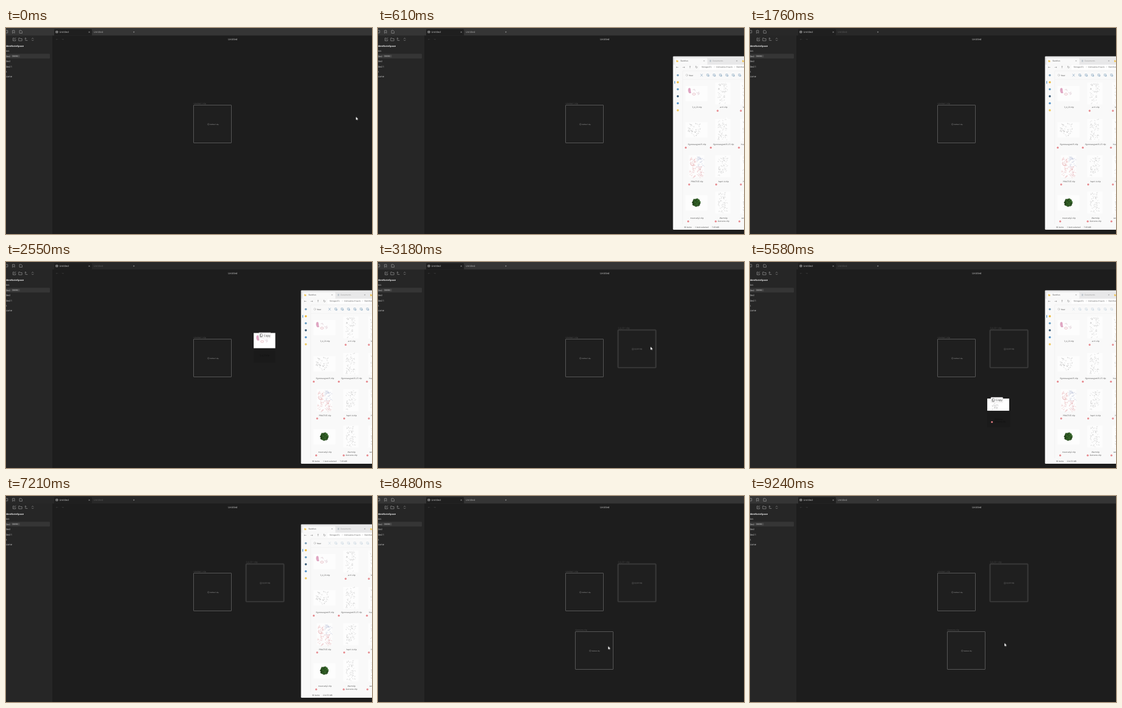
Recreate the animation shown at these times as an HTML page. Size 600 by 338 pixels, loop 9.42 s.

```html
<!DOCTYPE html>
<html lang="en">
<head>
<meta charset="utf-8">
<title>Dragging files onto a canvas</title>
<style>
  html, body { margin: 0; width: 100%; height: 100%; overflow: hidden; background: #1d1d1d; }
  svg { display: block; width: 100vw; height: 100vh; }
  text { font-family: "Open Sans", "Noto Sans", sans-serif; text-rendering: geometricPrecision; }
  .glyph { font-family: "DejaVu Sans", sans-serif; text-anchor: middle; }
  .line { fill: none; stroke: #b0b0b0; stroke-width: .55; stroke-linecap: round; stroke-linejoin: round; }
  .app text { font-size: 4.1px; fill: #cfcfcf; }
  .app .head { font-weight: 700; fill: #e6e6e6; font-size: 3.95px; }
  .app .badge { font-size: 2.4px; font-weight: 600; fill: #d0d0d0; }
  .app .faint { fill: #505050; }
  .card rect { fill: #1f1f1f; stroke: #565656; }
  .card .name { font-size: 3.2px; fill: #5c5c5c; }
  .card .file { font-size: 2.15px; font-weight: 600; fill: #a8a8a8; }
  .card circle { fill: none; stroke: #8c8c8c; stroke-width: .4; }
  .files text { font-size: 3.15px; fill: #444; }
  .files .mid { text-anchor: middle; }
  .files .soft { fill: #909090; }
  .files .glyph { font-size: 5px; fill: #707070; }
  .files .small { font-size: 3.6px; }
  .drag text { font-size: 3.15px; fill: #101010; text-anchor: middle; }
  .drag .shade { fill: #1a1a1a; }
  #tip text { font-size: 4.6px; fill: #333; text-anchor: start; }
</style>
</head>
<body>
<svg viewBox="0 0 600 338" xmlns="http://www.w3.org/2000/svg">
  <defs>
    <g id="tip">
      <rect width="19.5" height="8.6" rx=".6" fill="#fbfbfb" stroke="#ddd6d9" stroke-width=".4"/>
      <path class="line" style="stroke:#555" d="M3 2H5L6 3V6H3ZM3 3H2V7H5V6"/>
      <text x="8" y="6">Copy</text>
    </g>
    <g id="dot">
      <circle r="1.5" fill="#e0696f"/>
      <path d="M-.6 -.6L.6 .6M.6 -.6L-.6 .6" stroke="#fff" stroke-width=".4"/>
    </g>
    <g id="doodle" fill="none" stroke="#dba0ac" stroke-width=".45">
      <path d="M5 5q3-2 3 1q0 3 1 6h-3q-2-3-1-7" stroke="#c8749c" fill="#e3a9c6"/>
      <ellipse cx="14" cy="14" rx="2.6" ry="1.6" stroke="#d07c88"/>
      <path d="M12 7l3-1 1 3M18 11l3 2 1-3M20 15q3 0 3-3" stroke="#c4a4b4"/>
    </g>
    <path id="folder" d="M0 0H1.3L1.8 .6H3.2V3H0Z" fill="#efc65c"/>
  </defs>

  <g class="app">
    <rect width="600" height="338" fill="#1d1d1d"/>
    <rect width="76" height="338" fill="#262626"/>
    <rect id="bar" width="600" height="12.3"/>
    <path d="M79 12.3V3q0-1.2 1.2-1.2H139.600q1.200 0 1.200 1.200V12.300Z" fill="#1f1f1f"/>
    <rect x="-2" y="42.300" width="74" height="7.600" rx="1" fill="#353535"/>
    <rect x="9" y="44" width="13.600" height="4.300" rx=".8" fill="#484848"/>
    <text class="badge" x="10.300" y="47">CANVAS</text>

    <path class="line" d="M-1 4H2.800V8H-1M11 4H14V8.500L12.500 7L11 8.500ZM22.500 4H25L26.500 5.500V8.500H22.500Z"/>
    <path class="line" d="M13.500 16.600H11.400V21H15.800V19M13 19.400L16 16M21.200 16.600H23L23.700 17.500H26.200V21H21.200ZM32 20.500V16.300M31 17.300L32 16.300L33 17.300M33 20.500H35M42.500 17.600L43.700 16.400L44.900 17.600M42.500 19.800L43.700 21L44.900 19.800"/>
    <path class="line" d="M82 5H85V8H82ZM82 6.500H85M83.500 5V8"/>

    <text class="head" x="-.5" y="31">ldenNoteSpace</text>
    <g id="notes"></g>
    <text x="87.500" y="8.200">Untitled</text>
    <text id="tab" x="143.700" y="8.200">Untitled</text>
    <text x="364" y="19.700">Untitled</text>
    <text class="glyph" x="136.500" y="8.200">×</text>
    <text class="glyph" x="209.700" y="8">+</text>
    <text class="glyph faint" x="83.600" y="19.500">←</text>
    <text class="glyph faint" x="93" y="19.500">→</text>
  </g>

  <g id="cards"></g>

  <g id="files" class="files">
    <rect x="483.600" y="46.600" width="120" height="284.400" rx="1" fill="#f9f9f9"/>
    <path d="M484 60.200V47H600V60.200Z" fill="#e8e8e9"/>
    <rect x="486.500" y="49.500" width="53.500" height="11" rx="1.500" fill="#f9f9f9"/>
    <use href="#folder" x="489" y="52.800"/>
    <use href="#folder" x="597" y="52.800"/>
    <rect x="543.700" y="52.500" width="2.500" height="3" fill="#bcc5cc"/>
    <text x="495.700" y="55.200">Sketches</text>
    <text class="soft" x="548.600" y="55.200">Documents</text>
    <rect x="527" y="60.800" width="80" height="7.400" rx="1" fill="#fff"/>
    <text x="530.500" y="65.400">Storage (E:)</text>
    <text x="554.300" y="65.400" style="font-size:2.900px">Inkmeadow Projects</text>
    <text x="587.500" y="65.400">Sketches</text>
    <path d="M500 70.200H600M500 84.300H600M499.500 70V322" stroke="#ebebeb" stroke-width=".5"/>
    <g id="marks"></g>
    <circle class="line" cx="506.300" cy="77.400" r="1.600"/>
    <text x="510" y="78.600">New</text>
    <g id="tools" class="line" style="stroke:#6d93b3"></g>
    <rect x="486" y="86.800" width=".9" height="4.600" rx=".4" fill="#2878bd"/>
    <g id="grid"></g>
    <text x="501.700" y="328">96 items</text>
    <g id="picked">
      <text x="519.600" y="328">1 item selected</text>
      <text x="547.300" y="328">7.83 MB</text>
    </g>
    <text id="total" x="519.600" y="328">224.53 MB</text>
  </g>

  <g id="dragA" class="drag">
    <rect class="shade" y="25" width="35.500" height="23.500"/>
    <rect width="35.500" height="25" fill="#fff"/>
    <use href="#doodle"/>
    <text x="17.700" y="38">3_4_23.clip</text>
    <use href="#tip" x="8.500" y="-.5"/>
  </g>
  <g id="dragB" class="drag">
    <rect class="shade" y="20" width="37.500" height="26.500"/>
    <rect width="36" height="20" fill="#fff"/>
    <g id="dragLines"></g>
    <text x="18.700" y="34.500">WarmUp</text>
    <text x="20.700" y="39">Gestures.clip</text>
    <use href="#dot" x="7.700" y="38.500"/>
    <use href="#tip" x="6" y="-2"/>
  </g>
  <path id="cursor" d="M0 0V5L1.200 4L2 5.600L2.800 5.200L2 3.700H3.600Z" fill="#fff"/>
</svg>

<script>
const LOOP = 9420;
const OPEN = 610, GRAB_A = 2190, DROP_A = 2720, REOPEN = 4360, GRAB_B = 5340, DROP_B = 7190, CLOSE = 8150;
const $ = id => document.getElementById(id);
const fill = (id, items, draw) => { $(id).innerHTML = items.map(draw).join(''); };

function random(seed) {
  seed *= 7919;
  return () => (seed = (seed * 16807) % 2147483647) / 2147483647;
}

// Small curved pencil strokes scattered over a box.
function scribble(x, y, w, h, count, size, seed, color = '#b4b4b4') {
  const next = random(seed);
  const swing = () => ((next() - .5) * size * 2).toFixed(1);
  let d = '';
  for (let i = 0; i < count; i++) {
    d += `M${(x + next() * w).toFixed(1)} ${(y + next() * h).toFixed(1)}` +
         `q${swing()} ${swing()} ${swing()} ${swing()}`;
  }
  return `<path d="${d}" fill="none" stroke="${color}" stroke-width=".4"/>`;
}

function tree(x, y) {
  const next = random(6);
  let leaves = '';
  for (let i = 0; i < 80; i++) {
    const r = Math.sqrt(i / 80), a = i * 2.4;
    leaves += `<circle cx="${x + Math.cos(a) * r * 6.2}" cy="${y + Math.sin(a) * r * 6}" r="${.7 + next()}" fill="hsl(108 42% ${17 + next() * 14}%)"/>`;
  }
  return leaves;
}

const figures = (x, y) =>
  scribble(x, y + 2, 9, 32, 55, 2.5, 11, '#e2a3a5') +
  scribble(x + 11, y, 10, 16, 35, 2.5, 12, '#b3bad3') +
  scribble(x + 10, y + 16, 11, 18, 40, 2.5, 13, '#e0a6ac');

const special = {
  '3_4_23': () => '<use href="#doodle" x="504" y="94.500"/>',
  PRACTICE: () => figures(512, 211),
  treestudy2: () => tree(522, 286.500)
};

// One file: preview, centred name and a sync badge at the name's lower left.
function file(name, col, row) {
  const x = [522, 565.500, 606][col], y = 89.500 + row * 59.700;
  const wide = col === 0 && name !== 'PRACTICE';
  const w = wide ? 36 : 25, h = wide ? 25 : 36;
  const left = x - w / 2, top = y + (36 - h) / 2;
  const lines = (name + '.clip').split('|');
  const textY = 131.400 + row * 60.550;
  const half = Math.max(...lines.map(s => s.length)) * .8;
  const art = special[name] ? special[name]()
    : scribble(left + 5, top + 1, w / 2 + 2, h - 3, 60, 1.800, 3 + row * 3 + col);
  return `<rect x="${left}" y="${top}" width="${w}" height="${h}" fill="#fdfdfd"/>` + art +
    lines.map((s, i) => `<text class="mid" x="${x + 1}" y="${textY + i * 5}">${s}</text>`).join('') +
    (col + row ? `<use href="#dot" x="${x - half - 1.500}" y="${textY + 4.300}"/>` : '');
}

const card = ([id, x, y, name]) =>
  `<g class="card" id="${id}" transform="translate(${x} ${y})">
    <rect width="62" height="62" rx=".5"/>
    <text class="name" id="${id}Name" y="-1.600">${name}.clip</text>
    <circle cx="24.300" cy="31.500" r="1.300"/>
    <text class="file" x="26.700" y="32.300">${name}.clip</text></g>`;

fill('notes', ['tos', 'tled', 'tled', 'tled 1', 's', 'come'],
  (s, i) => `<text x="-.5" y="${39.400 + i * 8.400}">${s}</text>`);
fill('cards', [['first', 307.5, 126.5, 'Untitled 1'], ['second', 393.5, 111.5, '3_4_23 1'], ['third', 323.5, 222.5, 'Gestures']], card);
fill('grid', [['3_4_23', 'acr1', 'Minutes'], ['figuresaugust25', 'figuresaugust25-27', 'heads-small'],
  ['PRACTICE', 'hapt1-4', 'hapt5-8'], ['treestudy2', 'WarmUp|Gestures', 'swordstudy']],
  (names, row) => names.map((name, col) => file(name, col, row)).join(''));

const rail = ['#7fa3bd', '#edba3c', '#6b9fc4', '#3c5d78', '#5c98cc', '#efca62'].map((color, i) =>
  `<circle cx="491.500" cy="${77.500 + i * 11.500}" r="1.800" fill="${color}"/>`);
const arrows = ['←', '→', '↑', '↻'].map((s, i) =>
  `<text class="glyph" x="${490.500 + i * 10.500}" y="66.200">${s}</text>`);
const signs = [['×', 534.600, 55.300], ['×', 588.200, 55.300], ['›', 551.300, 65.400], ['›', 584.500, 65.400]].map(([s, x, y]) =>
  `<text class="glyph small" x="${x}" y="${y}">${s}</text>`);
fill('marks', [...rail, ...arrows, ...signs], s => s);
fill('tools', [...'xoooooo'], (kind, i) =>
  `<path transform="translate(${530.500 + i * 10.400} 77.400)" d="${kind === 'x' ? 'M-1.500-1.800L1.500 1.800M1.500-1.800L-1.500 1.800' : 'M-1.500-1.800H1V1H-1.500ZM0 1.800H1.800V0'}"/>`);
$('dragLines').innerHTML = scribble(7, 8, 11, 9, 16, 2, 23, '#888');

// Stops are [ms, value, easing]; the last value holds to the end of the loop.
function play(id, prop, stops, ease) {
  const frames = stops.map(([ms, value, easing = ease]) => ({ offset: ms / LOOP, [prop]: value, easing }));
  frames.push({ offset: 1, [prop]: stops[stops.length - 1][1] });
  $(id).animate(frames, { duration: LOOP, iterations: Infinity });
}

// Alternates between two values at the given times.
const flip = (id, prop, [a, b], ...times) =>
  play(id, prop, [0, ...times].map((ms, i) => [ms, i % 2 ? b : a]), 'step-end');
const show = (id, ...times) => flip(id, 'opacity', [0, 1], ...times);
const hide = (id, ...times) => flip(id, 'opacity', [1, 0], ...times);
const move = (id, stops) =>
  play(id, 'transform', stops.map(([ms, x, y, easing]) => [ms, `translate(${x}px, ${y}px)`, easing]), 'ease-in-out');

const blur = [OPEN + 60, DROP_A, REOPEN + 60, CLOSE];
flip('bar', 'fill', ['#353535', '#282828'], ...blur);
flip('tab', 'fill', ['#b0b0b0', '#5c5c5c'], ...blur);
show('files', OPEN, DROP_A, REOPEN, CLOSE);
show('second', DROP_A + 30);
show('secondName', 3030);
show('third', CLOSE + 30);
hide('picked', GRAB_B);
show('total', GRAB_B);
flip('tools', 'opacity', [1, .4], GRAB_B);

show('dragA', GRAB_A, DROP_A);
move('dragA', [[0, 504, 94], [GRAB_A, 504, 94, 'cubic-bezier(.7, 0, 1, .6)'], [2550, 406, 116.4]]);
show('dragB', GRAB_B, DROP_B);
move('dragB', [[0, 547, 272], [GRAB_B, 547, 272, 'linear'], [5580, 389, 224, 'ease-out'], [7000, 337, 240]]);

hide('cursor', GRAB_A, DROP_A, GRAB_B, CLOSE + 30);
move('cursor', [
  [0, 573.7, 145.8], [1550, 564, 146], [GRAB_A, 522, 106], [DROP_A, 424, 130], [3030, 424, 130],
  [3330, 469, 148], [3520, 469, 148], [3670, 571, 166], [REOPEN, 571, 166], [GRAB_B, 565, 284],
  [CLOSE, 357, 250], [9030, 426, 238.5], [9150, 426, 238.5], [9240, 417.2, 241.4]
]);
</script>
</body>
</html>
```
